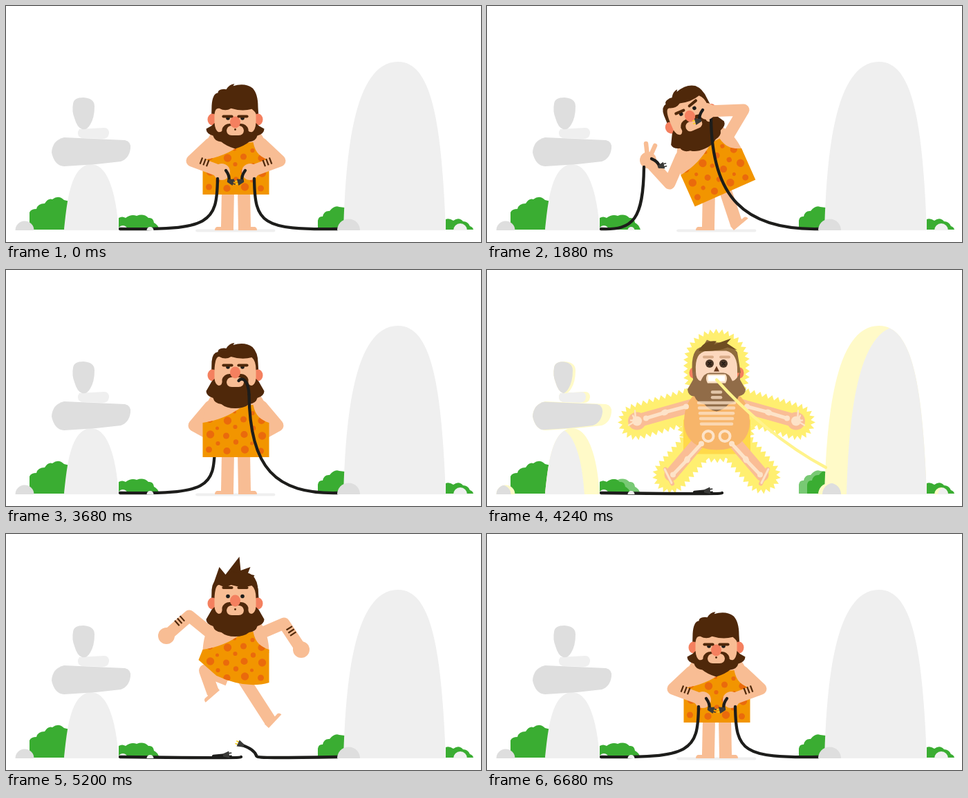
An HTML page with a canvas for the animation above (6720 ms loop, 687 by 343 pixels).

```html
<!DOCTYPE html>
<html lang="en">
<head>
<meta charset="utf-8">
<title>Caveman and cable</title>
<style>
html, body { margin: 0; width: 100%; height: 100%; overflow: hidden; background: #fff; }
canvas { display: block; }
</style>
</head>
<body>
<canvas id="stage" width="687" height="343"></canvas>
<script>
const c = document.getElementById('stage').getContext('2d');
const LOOP = 6720, SHOCK = 4240, RELEASE = 5040, PICKUP = 5450, MID = 332.5, GROUND = 326;
const SKIN = '#f8bd94', PINK = '#f4805f', HAIR = '#4f280a', WIRE = '#1d1d1b', METAL = '#3a3a38';
const STONE = '#dedede', PALE = '#efefef', GREEN = '#3aad32', BONE = '#fde3c8', GLOW = '#fffac8';
c.lineCap = c.lineJoin = 'round';

const ease = k => k * k * (3 - 2 * k);
const clamp = k => Math.max(0, Math.min(1, k));
function mix(a, b, k) {
  if (Array.isArray(a)) return a.map((v, i) => mix(v, b[i], k));
  return a + (b - a) * k;
}

function fill(d, color) { c.fillStyle = color; c.fill(new Path2D(d)); }
function stroke(d, color, width) {
  c.strokeStyle = color; c.lineWidth = width; c.stroke(new Path2D(d));
}
function dot(x, y, r, color, ry = r) {
  c.fillStyle = color; c.beginPath(); c.ellipse(x, y, r, ry, 0, 0, 7); c.fill();
}
function group(x, y, deg, draw) {
  c.save(); c.translate(x, y); c.rotate(deg * Math.PI / 180); draw(); c.restore();
}
function mirror(draw) {
  for (const s of [1, -1]) { c.save(); c.translate(332, 0); c.scale(s, 1); draw(); c.restore(); }
}

// ---- poses: arms are [elbow, hand], legs are [heel, foot angle, knee shift] ----
const flip = ([ax, ay, bx, by]) => [2 * MID - ax, ay, 2 * MID - bx, by];
function pose(armL, rest) {
  return {
    x: MID, y: 272, lean: 0, drop: 0, look: 0, lift: 0, tilt: 0, eye: 0, plug: 75,
    armL, armR: flip(armL), legL: [329, GROUND, 0, 0], legR: [336, GROUND, 0, 0], ...rest
  };
}
const fiddle = pose([269, 225, 312, 241], { y: 274, drop: 10, look: 8 });
const startle = pose([262, 205, 285, 226], { y: 266, drop: -8, lift: 8, eye: 1 });
const ponder = pose([262, 222, 298, 235], { lift: 4 });
const bite = pose([264, 258, 233, 224], {
  x: 344.5, lean: -24, tilt: 16, lift: 1, plug: 45,
  armR: [371, 151, 318, 153], legR: [357, GROUND, 0, 0]
});
const stoop = { ...bite, plug: 82, armL: [279, 262, 290, 308], armR: [379, 206, 366, 212] };
const hidden = pose([272, 226, 308, 246]);
const flung = pose([250, 124, 216, 142], {
  y: 190, lift: 8.5, eye: 1.5, legL: [270, 230, 40, 0], legR: [395, 230, -40, 0]
});
const leap = pose([265, 119, 232, 148], {
  y: 218, drop: 2, lift: 8.5, eye: 1.5, armR: [402, 130, 427, 168],
  legL: [309, 227, -41, -22], legR: [380, 282, -47, 0]
});
const land = pose([262, 205, 252, 238], { y: 274, drop: 4, lift: 8 });
const squat = pose([264, 245, 292, 300], { y: 288, drop: 14, look: 8 });
const TIMELINE = [
  [0, fiddle], [480, fiddle], [560, startle], [760, startle], [960, ponder], [1360, ponder],
  [1720, bite], [2080, bite], [2500, stoop], [2760, stoop], [3200, hidden], [SHOCK, hidden],
  [RELEASE, flung], [5200, leap], [5340, land], [5480, squat], [5700, squat], [6120, fiddle],
  [LOOP, fiddle]];

function poseAt(t) {
  const i = TIMELINE.findIndex(([end]) => end > t);
  const [start, a] = TIMELINE[i - 1], [end, b] = TIMELINE[i];
  const k = ease((t - start) / (end - start)), p = {};
  for (const key in a) p[key] = mix(a[key], b[key], k);
  if (t > 1800 && t < 2120) p.legR[2] = -40 * Math.abs(Math.sin(Math.PI * (t - 1800) / 160));
  return p;
}

// ---- scenery: outline, colour, shadow shift when lit ----
const BUSHES = [
  ['M34 325V300Q36 295 44 295Q46 287 56 287Q61 279 67 281Q76 274 84 282L92 284V325Z', 0],
  ['M163 325V308Q168 305 173 308Q181 302 189 305Q199 301 206 308Q213 307 214 315Q219 317 222 325Z', -14],
  ['M451 325V312Q452 305 458 306Q460 297 468 298Q475 289 482 292L490 293V325Z', 12],
  ['M636 325V310Q641 308 647 312Q655 306 661 313Q668 313 671 320Q675 321 676 325Z', 0]];
const STONES = [
  ['M84 326C88 290 92 231 123 230C152 230 161 290 163 326Z', PALE, -22],
  ['M106 179Q124 178 142 177Q149 177 149 185Q148 193 140 193L110 192Q103 190 104 183Z', PALE, -6],
  ['M97 142Q98 133 112 133Q128 134 128 146Q128 162 122 172Q117 181 110 179Q103 177 99 163Q95 153 97 142Z', STONE, -4],
  ['M84 191L172 195Q181 197 180 207Q178 222 166 226Q148 228 130 230L84 233Q70 232 66 213Q67 195 84 191Z', STONE, -13],
  ['M488 326C491 220 502 81 567 81C616 81 630 170 636 326Z', PALE, 32]];

function part(d, color, shift, glow, lit) {
  if (!lit || !shift) return fill(d, color);
  fill(d, glow);
  c.save(); c.clip(new Path2D(d)); c.translate(shift, 0); fill(d, color); c.restore();
}
function rock(x, r, color, shift, lit) {
  part(`M${x - r} 326A${r} ${r} 0 0 1 ${x + r} 326Z`, color, shift, GLOW, lit);
}
function scenery(lit) {
  for (const [d, shift] of BUSHES) part(d, GREEN, shift, '#78c974', lit);
  for (const [d, color, shift] of STONES) part(d, color, shift, GLOW, lit);
  rock(27, 13.5, STONE, -6, lit);
  rock(169, 7, PALE, 0, lit);
  rock(657, 10, PALE, 5, lit);
}

// ---- cables: lie flat, then rise to the end; the bend widens with height ----
function cable(from, [x, y]) {
  const bend = (325 - y) ** 2 / 550, side = Math.sign(from - x);
  stroke(`M${from} 324C${x + side * bend} 326 ${x + side} ${325 - bend} ${x} ${y}`, WIRE, 4.3);
}
function connector(prongs) {
  for (const s of [-2, 2]) stroke(`M6 ${s}H10`, prongs, 1.6);
  fill('M-2 -2L7 -5V5L-2 2Z', METAL);
}
function plug(x, y, deg, bend, prongs) {
  group(x, y, deg, () => {
    stroke(`M0 0Q10 ${bend / 15} 16 0`, WIRE, 4.3);
    group(16, 0, bend, () => connector(prongs));
  });
}
function lyingCable() {
  cable(165, [340, 324]);
  plug(300, 323, -6, 0, WIRE);
}

// ---- caveman ----
function leg(hip, [x, y, deg, knee], side) {
  const r = deg * Math.PI / 180, ax = 9 * side, ay = -5;
  const foot = [x + ax * Math.cos(r) - ay * Math.sin(r), y + ax * Math.sin(r) + ay * Math.cos(r)];
  const bend = mix(hip, foot, .5).map(v => v + knee);
  c.lineCap = 'butt';
  stroke(`M${hip}L${bend}L${foot}`, SKIN, 18);
  c.lineCap = 'round';
  group(x, y, deg, () => {
    c.scale(side, 1);
    fill('M0 0V-8H18V-5H24Q27 -4 27 0Z', SKIN);
  });
}
function torso(air) {
  fill('M-30 -95C-42 -85 -48 -65 -48 -45H48C48 -65 42 -85 30 -95Z', SKIN);
  const d = `M-48 -50C-28 -53 -8 -60 11 -75L25 -76C28 -60 36 -54 48 -50L48 ${-2 * air}
    Q${15 * air} ${8 * air} ${-48 + 20 * air} ${-12 * air}L${-48 - 6 * air} ${-35 * air}Z`;
  fill(d, '#f29500');
  c.save(); c.clip(new Path2D(d));
  for (let row = 0; row < 6; row++) {
    const odd = row % 2;
    for (let x = odd ? -27 : -39, n = row; x < 48; x += 25, n++)
      dot(x + n % 3, -11 - row * 11 + n % 2 * 2, (odd ? 2.5 : 4.5) + n % 3 * .6, '#ea6a0c');
  }
  c.restore();
}
function arm(shoulder, [ex, ey, hx, hy], bands) {
  stroke(`M${shoulder}L${ex} ${ey}L${hx} ${hy}`, SKIN, 17);
  dot(hx, hy, 12, SKIN);
  if (!bands) return;
  const deg = Math.atan2(hy - ey, hx - ex) * 180 / Math.PI;
  group(mix(ex, hx, .42), mix(ey, hy, .42) - 5, deg, () => {
    c.lineCap = 'butt';
    for (const x of [-5, 0, 5]) stroke(`M${x} -5V5`, HAIR, 2.2);
    c.lineCap = 'round';
  });
}
function fingers([, , x, y]) {
  for (const [dx, dy] of [[-3, -24], [10, -21]])
    stroke(`M${x + dx / 3} ${y - 6}L${x + dx} ${y + dy}`, SKIN, 6.5);
}

function head({ look, lift, tilt, eye }, wild, hook, covered) {
  if (wild) fill('M-34 -8L-31 -30L-23 -53L-14 -42L6 -68L8 -48L22 -53L18 -43L28 -41L24 -34L33 -22L34 -8Z', HAIR);
  const up = -look * .6, fringe = -26 + look * 1.35;
  fill(`M-34.5 -2L-34 -20Q-33 ${-33 + up} -25 ${-34 + up}Q-25 ${-38 + up} -20 ${-39 + up}
    Q-16 ${-40 + up} -13 ${-39 + up}Q-8 ${-47 + up} -1 ${-47 + up}L-3 ${-44 + up}
    Q14 ${-49 + up} 25 ${-41 + up}Q33 ${-33 + up} 33 -18L34 -2Z`, HAIR);
  for (const x of [-33, 33]) dot(x, 0, 7, PINK, 8.5);
  fill(`M-30 5V-8Q-29 ${fringe - 2} -23 ${fringe - 1}Q-14 ${fringe + 4} -6 ${fringe - 1}
    Q10 ${fringe + 4} 24 ${fringe}Q30 ${fringe + 5} 30 -8V25H-30Z`, SKIN);

  // The beard is pressed up against the chest when he looks down
  const b = -look * 1.2, tip = 48 - look * .7, top = look - 2, cheek = 13 + look * .4;
  const side = s => [[42, 23], [42, 30], [32, 33], [30, 41], [20, 42], [13, 48]]
    .map(([x, y]) => `${s * x} ${y + b}`);
  const l = side(-1), r = side(1);
  fill(`M-30 5L-34 9L${l[0]}Q${l[1]} ${l[2]}Q${l[3]} ${l[4]}Q${l[5]} 0 ${tip}
    Q${r[5]} ${r[4]}Q${r[3]} ${r[2]}Q${r[1]} ${r[0]}L34 9L30 5Q29 ${cheek} 24 ${cheek + 2}
    Q18 ${cheek + 2} 19 ${top + 8}Q16 ${top} 8 ${top}H-8Q-16 ${top} -19 ${top + 8}
    Q-18 ${cheek + 2} -24 ${cheek + 2}Q-29 ${cheek} -30 5Z`, HAIR);

  const m = 3 + look * .75;
  fill(`M-6 ${m}H6Q12 ${m + 1} 12.5 ${m + 7}Q12 ${m + 14} 5 ${m + 14}H-5
    Q-12 ${m + 14} -12.5 ${m + 7}Q-12 ${m + 1} -6 ${m}Z`, SKIN);
  if (!hook && !covered) dot(0, m + 5.5, 1.4, HAIR);
  const brow = -14.5 + look * 1.25;
  for (const x of [-10.5, 10.5]) dot(x, brow + 2.5 + eye, 2.8, WIRE);
  dot(0, look - 4, 7.5, PINK, 8.5);
  stroke(`M-17 ${brow - lift}H-5`, HAIR, 4.2);
  group(11, brow - lift - tilt / 4, -tilt, () => stroke('M-6 0H6', HAIR, 4.2));
  if (hook) stroke('M5 8C9 2 19 6 20 28', WIRE, 4.3);
}

function caveman(t) {
  const p = poseAt(t), { armL, armR } = p;
  const rad = p.lean * Math.PI / 180, cos = Math.cos(rad), sin = Math.sin(rad);
  const at = (x, y) => [p.x + x * cos - y * sin, p.y + x * sin + y * cos];
  const inAir = t > RELEASE && t < 5340;
  const air = inAir ? Math.sin(Math.PI * (t - RELEASE) / 320) : 0;
  const bitten = t >= 2080 && t < RELEASE, loose = t >= RELEASE && t < PICKUP;
  const behindL = t >= 3000 && t < SHOCK, behindR = t >= 2200 && t < SHOCK;
  const covered = t >= 1480 && t < 2200;
  const drawL = () => {
    if (t > 1640 && t < 2300) fingers(armL);
    arm(at(-37, -74), armL, !behindL && !(t > 1640 && t < 2080));
  };
  const drawR = () => arm(at(37, -74), armR, !behindR && !covered);
  const endL = [armL[2] - 6, armL[3] + 10];
  let endR = [armR[2] + 6, armR[3] + 10];
  if (bitten) endR = at(19, -91 + p.drop);
  if (loose) endR = mix([345, 190], [362, 322], clamp((t - RELEASE) / 120));

  if (!inAir) fill('M276 324.5H388Q391 326.5 388 328.5H276Q272 326.5 276 324.5Z', PALE);
  if (loose) lyingCable();
  if (behindL) { cable(165, endL); drawL(); }
  if (behindR) drawR();
  leg([MID - 11.5, p.y - 6], p.legL, -1);
  leg([MID + 11.5, p.y - 6], p.legR, 1);
  group(p.x, p.y, p.lean, () => torso(air));
  if (!behindL) drawL();
  if (!behindR && !covered) drawR();
  group(...at(-1, -119 + p.drop), p.lean, () => head(p, loose, bitten, covered));

  const touch = (t < 480 || t > 6160) && t % 480 < 120 ? 1 : 0;
  if (!behindL && !loose && t < SHOCK || t >= PICKUP) {
    cable(165, endL);
    plug(armL[2] + 5 + touch, armL[3] - 2, p.plug, -60, METAL);
  }
  cable(480, endR);
  if (covered) drawR();
  if (loose) {
    stroke(`M${endR}q-3 -9 -20 -15`, WIRE, 4.3);
    group(endR[0] - 20, endR[1] - 15, 205, () => connector('#ffd21c'));
  } else if (!bitten) plug(armR[2] - 6 - touch, armR[3] - 2, 105, 60, '#ffd21c');
}

// ---- electric shock ----
// Capsule around a segment with a toothed edge
function spiky(x1, y1, x2, y2, r, phase) {
  const a = Math.atan2(y2 - y1, x2 - x1), len = Math.hypot(x2 - x1, y2 - y1);
  const half = len + Math.PI * r, n = 2 * Math.round(half / 4.5);
  c.beginPath();
  for (let i = 0; i < n; i++) {
    let s = i * 2 * half / n, start = [x1, y1], along = a;
    if (s >= half) { s -= half; start = [x2, y2]; along += Math.PI; }
    const run = Math.min(s, len), out = along - Math.PI / 2 + Math.max(0, s - len) / r;
    const reach = r - ((i + phase) % 2 ? 6.5 : 0);
    c.lineTo(start[0] + run * Math.cos(along) + reach * Math.cos(out),
      start[1] + run * Math.sin(along) + reach * Math.sin(out));
  }
  c.fillStyle = '#ffef70';
  c.fill();
}
function bone(x1, y1, x2, y2) {
  stroke(`M${x1} ${y1}L${x2} ${y2}`, BONE, 5);
  dot(x1, y1, 4, BONE);
  dot(x2, y2, 4, BONE);
}
function skeleton() {
  mirror(() => {
    bone(-44, 121, -74, 129);
    bone(-76, 130, -102, 138);
    bone(-22, 175, -42, 197);
    bone(-43, 199, -63, 220);
    stroke('M-75 212L-65 232', BONE, 3);
    dot(-115, 142, 7, BONE);
    for (let k = 0; k < 4; k++) stroke(`M-117 142L${-127 + k * 3} ${148 - k * 7}`, BONE, 2.5);
    c.strokeStyle = BONE; c.lineWidth = 4;
    c.beginPath(); c.arc(-12, 164, 7.5, 0, 7); c.stroke();
  });
}
function skull() {
  for (const x of [299, 365]) dot(x, 72, 6.5, PINK, 8);
  fill('M297 72Q294 36 312 34L318 24L328 28Q350 26 362 42L367 72Z', '#8f6b3c');
  fill('M302 70Q300 42 318 40H346Q363 44 362 70V92H302Z', '#fcd8be');
  fill('M297 70L298 82L290 96Q291 106 300 106Q304 116 314 117Q322 127 332 128Q342 126 350 117Q361 116 364 106Q374 104 374 96L366 82V70Q362 82 355 84Q350 72 342 72H322Q314 72 309 84Q302 82 302 70Z', '#916c48');
  fill('M306 40Q314 24 332 26L328 31L353 22L347 29L362 39L348 35Q332 42 306 40Z', '#6f4d22');
  mirror(() => {
    stroke('M-18 49H-6', '#d9ab88', 4);
    dot(-10, 58.5, 6, '#4a3526');
    stroke('M-12 56.5L-8 60.5M-8 56.5L-12 60.5', '#1d1512', 1.5);
  });
  fill('M332 62L336 70H328Z', '#6b3c20');
  fill('M319 74H345Q349 80 345 87H319Q315 80 319 74Z', BONE);
  fill('M320 76H344V84H320Z', '#fff');
}
function shocked(t) {
  const rise = 80 * (1 - ease(clamp((t - SHOCK) / 160)));
  const dy = rise + 3 * Math.sin((t - 4640) / 55), phase = Math.floor(t / 80) % 2;
  c.save(); c.translate(0, dy);
  spiky(332, 56, 332, 75, 48, phase);
  spiky(332, 130, 332, 146, 57, phase);
  mirror(() => {
    spiky(-30, 118, -116, 143, 27, phase);
    spiky(-20, 168, -66, 221, 27, phase);
  });
  fill('M284 140H381V190H284Z', '#ffd94a');
  mirror(() => {
    stroke('M-30 118L-115 142M-22 168L-66 220', '#fabd95', 19);
    dot(-115, 142, 13, '#fabd95');
    stroke('M-74 212L-64 233', '#fabd95', 6);
  });
  fill('M300 104C288 114 285 130 285 145C286 172 308 184 332 184C358 184 379 172 380 145C380 130 376 114 364 104Z', '#f7b56a');
  skeleton();
  skull();
  c.globalAlpha = .75;
  for (let i = 0; i < 7; i++) {
    const w = i < 2 ? 6 : 28 - i;
    stroke(`M${332 - w} ${100 + i * 7.7}h${2 * w}`, BONE, 4.5);
  }
  c.globalAlpha = 1;
  c.restore();
  lyingCable();
  stroke(`M490 287C430 255 372 205 332 ${82 + dy}`, '#fff38c', 4.3);
}

function draw(t) {
  const shock = t >= SHOCK && t < RELEASE;
  c.fillStyle = '#fff';
  c.fillRect(0, 0, 687, 343);
  scenery(shock);
  if (shock) shocked(t); else caveman(t);
  rock(208.5, 5, PALE, 0, false);
  rock(495.5, 16.5, STONE, 6, shock);
}
function loop() {
  draw(performance.now() % LOOP);
  requestAnimationFrame(loop);
}
loop();
</script>
</body>
</html>
```
